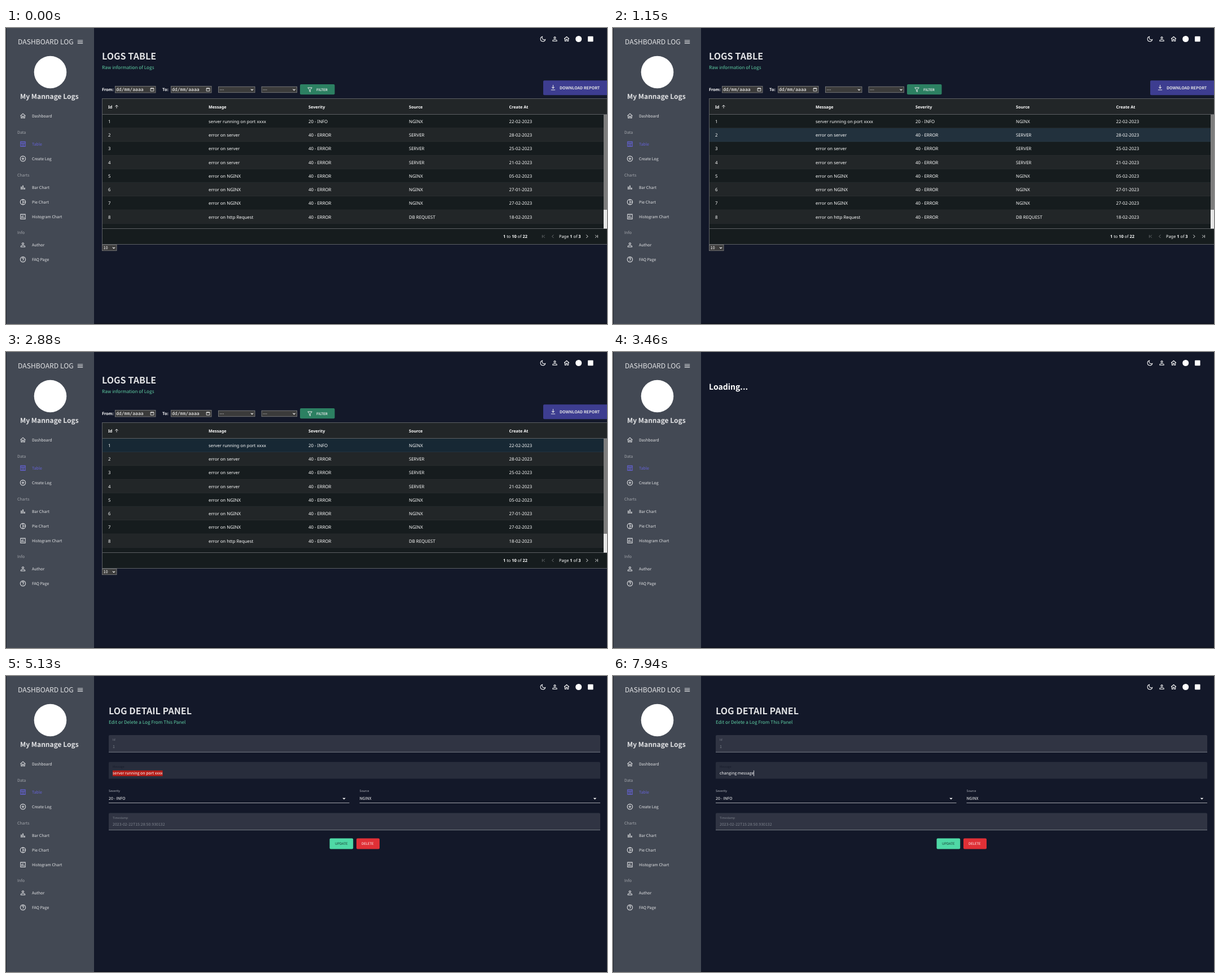
An HTML page for the animation above (8000 ms loop, 1065x526 px).

```html
<!DOCTYPE html>
<html lang="en">
<head>
<meta charset="utf-8">
<title>Dashboard Log</title>
<style>
html, body { margin: 0; width: 100%; height: 100%; overflow: hidden; background: #131829; }
svg { display: block; width: 100%; height: 100%; }
text { font-family: "Noto Sans CJK JP", "Noto Sans CJK SC", "Noto Sans CJK", "Open Sans", sans-serif;
  white-space: pre; text-rendering: geometricPrecision; }
.grid text { font-family: "Noto Sans", "Open Sans", sans-serif; }
text.mono { font-family: "DejaVu Sans Mono", "Noto Sans Mono", monospace; }
</style>
</head>
<body>
<svg id="stage" viewBox="0 0 1065 526" xmlns="http://www.w3.org/2000/svg"></svg>
<script>
const LOOP = 8000;
const INK = '#e2e3e5', GREEN = '#5fcfa5';

const rect = (x, y, w, h, fill, more = '') =>
  `<rect x="${x}" y="${y}" width="${w}" height="${h}" fill="${fill}" ${more}/>`;
const line = (x1, y1, x2, y2, color, width = 1) =>
  `<path d="M${x1} ${y1}L${x2} ${y2}" stroke="${color}" stroke-width="${width}"/>`;
// Text is placed by its left edge and the middle of its capitals.
const text = (x, cy, str, size, fill = INK, more = '') =>
  `<text x="${x}" y="${cy + size * 0.36}" font-size="${size}" fill="${fill}" ${more}>${str}</text>`;
const BOLD = 'font-weight="700"';

const ring = (r, cx = 12, cy = 12) => `M${cx - r} ${cy}a${r} ${r} 0 1 0 ${2 * r} 0a${r} ${r} 0 1 0 ${-2 * r} 0`;
const FRAME = 'M4 4h16v16H4z';
const ICONS = {
  home: 'M3.5 11.5 12 4l8.5 7.5M6 10v9h4v-6h4v6h4v-9',
  person: ring(3, 12, 8) + 'M5 19v-2c0-1.5 4-3 7-3s7 1.5 7 3v2z',
  table: FRAME + 'M4 9h16M9.5 9v11M14.5 9v11',
  plus: ring(9) + 'M12 7v10M7 12h10',
  bars: 'M6.5 9v10M12 5v14M17.5 13v6',
  pie: ring(9) + 'M12 3v18M12 12h9',
  poll: FRAME + 'M8 10v7M12 7v10M16 14v3',
  help: ring(9) + 'M9 10a3 3 0 1 1 4.5 2.3c-1 .7-1.5 1.1-1.5 2.2M12 16v2',
  menu: 'M3 7h18M3 12h18M3 17h18',
  moon: 'M10 4a8.3 8.3 0 1 0 10 10a7.5 7.5 0 0 1-10-10z',
  funnel: 'M4.5 5h15l-6 7.5V20l-3-2v-5.5z',
  download: 'M12 3v11M7.5 10l4.5 4.5 4.5-4.5M5 19.5h14',
  up: 'M12 20V5M5 12l7-7 7 7',
  left: 'M15 6l-6 6 6 6',
  right: 'M9 6l6 6-6 6',
  first: 'M17 6l-6 6 6 6M7 6v12',
  last: 'M7 6l6 6-6 6M17 6v12',
  down: 'M5 9l7 7 7-7',
  calendar: 'M4 6h16v14H4zM4 8h16M8 3v4M16 3v4'
};
const icon = (name, cx, cy, size = 13, color = INK, width = 2) =>
  `<path d="${ICONS[name]}" fill="none" stroke="${color}" stroke-width="${width}"
    transform="translate(${cx - size / 2} ${cy - size / 2}) scale(${size / 24})"/>`;

function sidebar() {
  const items = [
    ['home', 'Dashboard', 156], ['table', 'Table', 206], ['plus', 'Create Log', 232],
    ['bars', 'Bar Chart', 283], ['pie', 'Pie Chart', 309], ['poll', 'Histogram Chart', 335],
    ['person', 'Author', 385], ['help', 'FAQ Page', 411]
  ];
  const sections = [['Data', 185], ['Charts', 261], ['Info', 363]];
  return rect(0, 0, 156, 526, '#434954') + rect(0, 0, 1, 526, '#20242e')
    + text(21, 24.5, 'DASHBOARD LOG', 12.2) + icon('menu', 131.5, 24.5, 12.5)
    + '<circle cx="78.5" cy="78.5" r="28.8" fill="#fff"/>'
    + text(25, 121.5, 'My Mannage Logs', 12, INK, BOLD)
    + sections.map(([label, y]) => text(20, y, label, 7.1, '#a2a5ab')).join('')
    + items.map(([name, label, y]) => {
      const color = label === 'Table' ? '#6663dc' : INK;
      const width = name === 'bars' ? 3 : 2;
      return icon(name, 30, y + 0.3, 12.5, color, width) + text(46, y, label, 7, color);
    }).join('');
}

function topbar() {
  return icon('moon', 951.5, 19.5, 12.5, '#fff') + icon('person', 972.5, 19.5, 12.5, '#fff')
    + icon('home', 993.5, 19.5, 12.5, '#fff')
    + '<circle cx="1014.7" cy="19.5" r="5.5" fill="#fff"/>'
    + rect(1031, 14.7, 9.6, 9.6, '#fff', 'rx="1"');
}

const control = (x, y, w, h) =>
  rect(x + 0.5, y + 0.5, w - 1, h - 1, '#3b3b3b', 'stroke="#858585" stroke-width=".8"');
const dateInput = x => control(x, 103, 72.5, 12.5)
  + text(x + 2, 109.3, 'dd/mm/aaaa', 8.1, '#fff', 'class="mono"') + icon('calendar', x + 66, 109.2, 8.5, '#fff', 2.2);
const select = (x, y, w, value) => control(x, y, w, 11.5)
  + text(x + 2.5, y + 5.8, value, 7.4, '#fff') + icon('down', x + w - 5.5, y + 5.8, 7, '#fff', 3.5);

const COLUMNS = [181, 359, 536, 714, 891.5];
const HEADINGS = ['Id', 'Message', 'Severity', 'Source', 'Create At'];
const ROWS = [
  ['server running on port xxxx', '20 - INFO', 'NGINX', '22-02-2023'],
  ['error on server', '40 - ERROR', 'SERVER', '28-02-2023'],
  ['error on server', '40 - ERROR', 'SERVER', '25-02-2023'],
  ['error on server', '40 - ERROR', 'SERVER', '21-02-2023'],
  ['error on NGINX', '40 - ERROR', 'NGINX', '05-02-2023'],
  ['error on NGINX', '40 - ERROR', 'NGINX', '27-01-2023'],
  ['error on NGINX', '40 - ERROR', 'NGINX', '27-02-2023'],
  ['error on http Request', '40 - ERROR', 'DB REQUEST', '18-02-2023'],
  ['error on http Request', '40 - ERROR', 'DB REQUEST', '18-02-2023']
];
const ROW_H = 24.22;
const rowTop = i => 153.8 + i * ROW_H;

function tablePage() {
  const stripes = ROWS.map((_, i) =>
    rect(171, rowTop(i), 888, ROW_H, i % 2 ? '#222628' : '#161c1e')
    + line(171, rowTop(i + 1), 1059, rowTop(i + 1), '#3b3e3f', 0.7)).join('');
  const cells = ROWS.map((row, i) => [i + 1, ...row].map((value, c) =>
    text(COLUMNS[c], rowTop(i) + 12.4, value, 7.8, '#fff')).join('')).join('');
  const edge = '#5c5f63', dim = '#777b7d';
  const num = n => `<tspan font-weight="700">${n}</tspan>`;
  return text(170, 50.5, 'LOGS TABLE', 16.1, INK, BOLD)
    + text(170, 70.3, 'Raw information of Logs', 8.2, GREEN)
    + text(170, 109, 'From:', 7.2, '#fff', BOLD) + dateInput(193)
    + text(277, 109, 'To:', 7.2, '#fff', BOLD) + dateInput(292)
    + select(376, 103.7, 65.5, '---') + select(452.5, 103.7, 63.5, '---')
    + rect(521, 100, 61.5, 18.3, '#2c8062', 'rx="2"') + icon('funnel', 538.5, 109.5, 12, INK)
    + text(550, 109.5, 'FILTER', 6.1, INK, BOLD)
    + rect(952, 93.2, 120, 26, '#3d3d90', 'rx="2"') + icon('download', 969.5, 106, 12.5, INK)
    + text(981, 106.2, 'DOWNLOAD REPORT', 7.1, INK, BOLD)
    + '<g class="grid">'
    + rect(170.5, 125.5, 900, 259, '#161c1e') + rect(171, 126, 894, 27.5, '#222628')
    + HEADINGS.map((h, c) => text(COLUMNS[c], 140, h, 7.25, '#fff', BOLD)).join('')
    + icon('up', 196, 139.7, 9, '#fff', 2.2)
    + '<clipPath id="view"><path d="M170 153.5H1065V356.5H170z"/></clipPath><g clip-path="url(#view)">'
    + stripes + rect(171, 0, 888, ROW_H, '#2196f3', 'id="hover"') + cells
    + rect(526.4, 154.3, 177, 23.4, 'none', 'id="focus" stroke="#2196f3" stroke-width=".8"') + '</g>'
    + line(170, 153.5, 1065, 153.5, edge) + line(170, 356.5, 1065, 356.5, edge)
    + rect(1059, 154, 6, 169, '#7d7d7d') + rect(1059, 323, 6, 33.5, '#e6e6e6')
    + rect(170.5, 125.5, 900, 259, 'none', `stroke="${edge}"`)
    + text(881, 370.5, `${num(1)} to ${num(10)} of ${num(22)}`, 7.4, '#fff')
    + text(980, 370.5, `Page ${num(1)} of ${num(3)}`, 7.4, '#fff')
    + icon('first', 952.5, 370.3, 10, dim) + icon('left', 969, 370.3, 11, dim)
    + icon('right', 1029.7, 370.3, 11, '#fff') + icon('last', 1046.3, 370.3, 10, '#fff')
    + '</g>' + select(170, 384.7, 26.5, '10');
}

function detailPage() {
  const box = (y, h, alpha) =>
    `<path d="M182 ${y + h}v${2 - h}q0-2 2-2h867q2 0 2 2v${h - 2}z" fill="#fff" fill-opacity="${alpha}"/>`;
  const muted = '#7f848e', rule = '#8f939c';
  const disabled = (y, label, value) => box(y, 30.3, 0.12)
    + line(182, y + 30.3, 1053, y + 30.3, rule, 0.8)
    + text(189, y + 8.6, label, 5.2, muted) + text(189, y + 20.3, value, 7, muted);
  const choice = (x, w, label, value) => text(x, 204, label, 5.25, '#b9bcc3')
    + text(x, 217.8, value, 7, '#fff') + line(x, 225.5, x + w, 225.5, '#c4c6cb', 0.8)
    + `<path d="M${x + w - 12.3} 216.8h5.6l-2.8 2.8z" fill="#fff"/>`;
  const button = (x, w, fill, tx, label, color) => rect(x, 288.5, w, 19, fill, 'rx="2"')
    + text(tx, 298.2, label, 6, color, 'font-weight="500"');
  return text(182, 62, 'LOG DETAIL PANEL', 16.1, INK, BOLD)
    + text(182, 81.8, 'Edit or Delete a Log From This Panel', 8.2, GREEN)
    + disabled(105, 'Id', '1')
    + box(152.8, 29.7, 0.09)
    + '<path id="messageRule" d="M182 182.5H1053" stroke="#a0a3aa" stroke-width=".8"/>'
    + text(189, 161.3, 'Message', 5.2, '#b9bcc3', 'id="messageLabel"')
    + rect(189, 167.8, 0, 10.2, '#b31d18', 'id="selection"')
    + text(189, 172.9, '', 7, '#fff', 'id="message"')
    + rect(189, 167.8, 0.8, 10.2, '#fff', 'id="caret"')
    + choice(182, 426.5, 'Severity', '20 - INFO') + choice(626.5, 426.5, 'Source', 'NGINX')
    + disabled(243.4, 'Timestamp', '2023-02-22T15:28:50.930132')
    + button(573.5, 41.7, '#4fd9a6', 583, 'UPDATE', '#173a31')
    + button(621, 41, '#e03036', 630, 'DELETE', '#fff');
}

document.getElementById('stage').innerHTML =
  rect(0, 0, 1065, 526, '#131829') + rect(0, 524.5, 1065, 1.5, '#0d111d')
  + sidebar() + topbar()
  + `<g id="table">${tablePage()}</g>`
  + `<g id="loading">${text(170, 62, 'Loading...', 14, '#fff', BOLD)}</g>`
  + `<g id="detail">${detailPage()}</g>`;

const el = id => document.getElementById(id);
const show = (id, on) => el(id).setAttribute('display', on ? 'inline' : 'none');
const put = (id, attrs) => { for (const k in attrs) el(id).setAttribute(k, attrs[k]); };

// [time, hovered row number]; 0 means none.
const HOVERS = [[0, 0], [280, 9], [320, 8], [770, 7], [810, 6], [870, 5], [930, 4], [980, 3],
  [1150, 2], [1350, 3], [1520, 4], [1780, 3], [1890, 2], [2880, 1]];
const OLD = ROWS[0][0], NEW = 'changing message';
const KEYS = [5880, 5990, 6100, 6200, 6310, 6420, 6530, 6640, 6880, 6970, 7060, 7230, 7380, 7480, 7640, 7740];
const T = { cellFocus: 3050, rowSelect: 3190, loading: 3390, detail: 3510, edit: 4370, drag: 4420, dragEnd: 4900, allSelected: 5130 };

function drawTable(t) {
  const row = HOVERS.filter(([at]) => t >= at).pop()[1];
  show('hover', row > 0);
  put('hover', { y: rowTop(row - 1), 'fill-opacity': t >= T.rowSelect ? 0.3 : 0.1 });
  show('focus', t >= T.cellFocus);
}

function drawMessage(t) {
  const typed = KEYS.filter(at => t >= at).length;
  const value = typed ? NEW.slice(0, typed) : OLD;
  const node = el('message');
  if (node.textContent !== value) node.textContent = value;
  const edgeAt = n => 189 + (n > 0 ? node.getSubStringLength(0, n) : 0);

  const editing = t >= T.edit;
  const dragged = Math.min(1, Math.max(0, (t - T.drag) / (T.dragEnd - T.drag)));
  const selected = typed ? 0 : t >= T.allSelected ? OLD.length : Math.round(dragged * (OLD.length - 1));
  const start = edgeAt(value.length - selected), end = edgeAt(value.length);
  put('selection', { x: start, width: end - start });
  put('caret', { x: end });
  show('caret', editing && !selected);
  show('messageRule', !editing);
  put('messageLabel', { fill: editing ? '#171c2b' : '#b9bcc3' });
}

function draw(t) {
  show('table', t < T.loading);
  show('loading', t >= T.loading && t < T.detail);
  show('detail', t >= T.detail);
  if (t < T.loading) drawTable(t);
  else if (t >= T.detail) drawMessage(t);
}

const begin = performance.now();
function tick() {
  draw((performance.now() - begin) % LOOP);
  requestAnimationFrame(tick);
}
tick();
</script>
</body>
</html>
```
